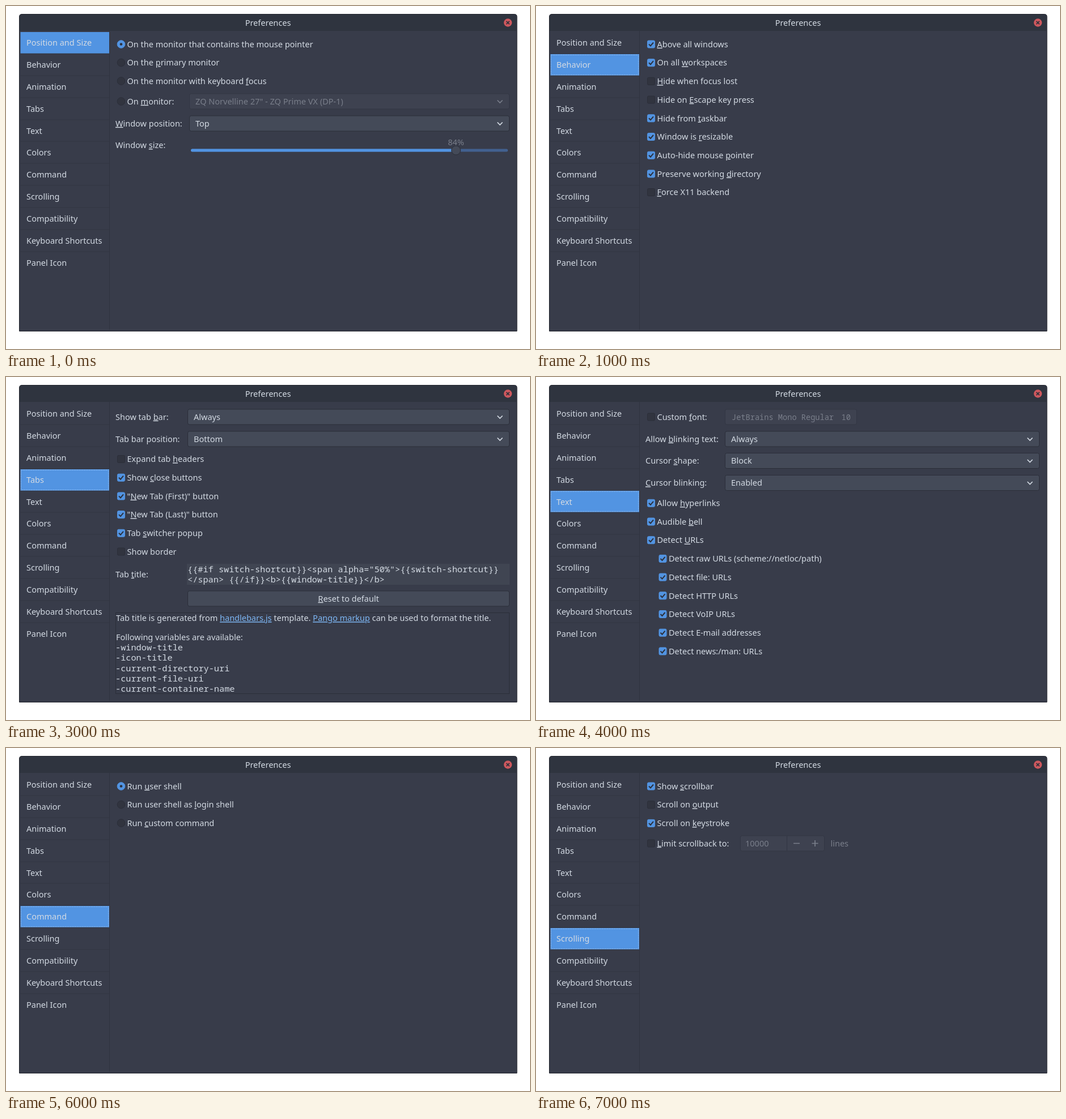
Recreate the animation shown at these times as an HTML page. Size 924 by 606 pixels, loop 8 s.

```html
<!DOCTYPE html>
<html lang="en">
<head>
<meta charset="utf-8">
<title>Preferences</title>
<style>
  html, body { margin: 0; height: 100%; overflow: hidden; background: #fff; }
  svg { display: block; }
  text { font: 14.5px "Noto Sans", "Open Sans", sans-serif; fill: #d3dae3; white-space: pre; }
  .mono { font: 15.25px "Noto Sans Mono", "DejaVu Sans Mono", monospace; }
  .font { font-size: 13.65px; }
  .dim { fill: #797e8a; }
  .mid { text-anchor: middle; }
  .key, .link { text-decoration: underline; text-decoration-skip-ink: none; }
  .link { fill: #7db7f5; }
  .line { fill: none; stroke: #d3dae3; stroke-width: 1.7; }
  .line.dim { stroke: #797e8a; }
</style>
</head>
<body>
<svg id="stage" width="924" height="606" viewBox="0 0 924 606"></svg>
<script>
const EDGE = '#2b2e39', BLUE = '#5294e2', DARK = '#2c303b', BUTTON = '#444a58';
const PAGE_MS = 1000, RIGHT = 887.5, ROW = 38.85, STEP = 32.7;

// y is always the vertical centre of a control; "_" marks the mnemonic letter.
const text = (x, y, label, cls = '') =>
  `<text x="${x}" y="${y + 5.2}" class="${cls}">${label.replace(/_(.)/, '<tspan class="key">$1</tspan>')}</text>`;

const rect = (x, y, w, h, fill, stroke = 'none', r = 0) =>
  `<rect x="${x}" y="${y}" width="${w}" height="${h}" rx="${r}" fill="${fill}" stroke="${stroke}"/>`;

const box = (x, y, right, dim) =>
  rect(x, y - 13.5, right - x, 27, dim ? '#3e4250' : BUTTON, dim ? '#323643' : EDGE, 3);

const combo = (x, y, label, { right = RIGHT, dim = '' } = {}) =>
  box(x, y, right, dim) + text(x + 10.5, y, label, dim) +
  `<path class="line ${dim}" d="M${right - 21} ${y - 2}l4.5 4.5 4.5-4.5"/>`;

const button = (x, y, label) => box(x, y, RIGHT, '') + text((x + RIGHT) / 2, y, label, 'mid');

const check = (y, label, on, x = 203) =>
  rect(x - 6.5, y - 6.5, 13, 13, on ? BLUE : '#31343f', on ? BLUE : EDGE, 2) +
  (on ? `<path d="M${x - 4} ${y}l3 3 5-6" fill="none" stroke="${DARK}" stroke-width="2"/>` : '') +
  text(x + 10.5, y, label);

const checks = (y, items, x) =>
  items.map(([label, on], i) => check(y + i * STEP, label, on, x)).join('');

const radio = (y, label, on) =>
  `<circle cx="203" cy="${y}" r="6.8" fill="${on ? BLUE : '#31343f'}" stroke="${on ? BLUE : EDGE}"/>` +
  (on ? `<circle cx="203" cy="${y}" r="2.3" fill="${DARK}"/>` : '') + text(213.5, y, label);

const slider = (x, y, knob, label) =>
  rect(x, y - 2.5, 885 - x, 5, '#426190', 'none', 2.5) +
  rect(x, y - 2.5, knob - x, 5, BLUE, 'none', 2.5) +
  `<circle cx="${knob}" cy="${y}" r="8" fill="${BUTTON}" stroke="${EDGE}"/>` +
  text(knob, y - 14, label, 'mid dim');

const swatch = (x, y, color, dim) =>
  rect(x - 22, y - 12.5, 44, 25, dim ? '#3e4250' : BUTTON, dim ? '#323643' : EDGE, 3) +
  rect(x - 17.5, y - 8, 35, 16, color, EDGE);

const swatches = (y, colors) =>
  colors.split(' ').map((c, i) => swatch(390 + i * 57.15, y, '#' + c)).join('');

const tabs = ['Position and Size', 'Behavior', 'Animation', 'Tabs', 'Text', 'Colors', 'Command',
  'Scrolling', 'Compatibility', 'Keyboard Shortcuts', 'Panel Icon'];

const pages = [
  // Position and Size
  radio(67.5, 'On the monitor that contains the mouse pointer', true) +
  radio(100, 'On the _primary monitor') +
  radio(132.5, 'On the monitor with keyboard _focus') +
  radio(168.5, 'On _monitor:') +
  combo(323.5, 168.5, 'ZQ Norvelline 27" - ZQ Prime VX (DP-1)', { dim: 'dim' }) +
  text(193, 207.5, '_Window position:') + combo(323.5, 207.5, 'Top') +
  text(193, 246, 'Window _size:') + slider(326, 255, 793.5, '84%'),

  // Behavior
  checks(67.5, [['_Above all windows', true], ['On all _workspaces', true],
    ['_Hide when focus lost'], ['Hide on _Escape key press'], ['Hide from _taskbar', true],
    ['Window is _resizable', true], ['Auto-hide mouse _pointer', true],
    ['Preserve working _directory', true], ['_Force X11 backend']]),

  // Animation
  check(67.5, '_Override default window animations', true) +
  text(193, 103, '_Show animation:') + combo(316.5, 103, 'Linear tweening') +
  text(193, 142, '_Hide animation:') + combo(316.5, 142, 'Linear tweening'),

  // Tabs
  text(193, 70.5, 'Show tab _bar:') + combo(320.5, 70.5, 'Always') +
  text(193, 109.5, 'Tab bar position:') + combo(320.5, 109.5, 'Bottom') +
  checks(145, [['Expand tab _headers'], ['Show _close buttons', true],
    ['"_New Tab (First)" button', true], ['"_New Tab (Last)" button', true],
    ['Tab _switcher popup', true], ['Show border']]) +
  text(193, 348.5, 'Tab _title:') + rect(319, 330, 569, 37, '#404552') +
  text(320, 339.5, '{{#if switch-shortcut}}&lt;span alpha="50%">{{switch-shortcut}}', 'mono') +
  text(320, 357.5, '&lt;/span> {{/if}}&lt;b>{{window-title}}&lt;/b>', 'mono') +
  button(320.5, 391.5, '_Reset to default') +
  rect(193.5, 416.5, 694, 143, 'none', EDGE) +
  text(194, 426, 'Tab title is generated from <tspan class="link">handlebars.js</tspan> template. ' +
    '<tspan class="link">Pango markup</tspan> can be used to format the title.') +
  text(194, 460, 'Following variables are available:') +
  ['window-title', 'icon-title', 'current-directory-uri', 'current-file-uri', 'current-container-name']
    .map((name, i) => text(193, 477.5 + i * 18.4, '-' + name, 'mono')).join(''),

  // Text
  check(70.5, 'Custom _font:') + box(333.5, 70.5, 565.5, 'dim') +
  text(345, 70.5, 'JetBrains Mono Regular', 'mono font dim') + text(538.5, 70.5, '10', 'mono font dim') +
  text(193, 109.5, 'Allow _blinking text:') + combo(333.5, 109.5, 'Always') +
  text(193, 148, 'Cursor _shape:') + combo(333.5, 148, 'Block') +
  text(193, 187, '_Cursor blinking:') + combo(333.5, 187, 'Enabled') +
  checks(222.8, [['Allow _hyperlinks', true], ['Audible _bell', true], ['Detect _URLs', true]]) +
  checks(320.9, ['raw URLs (scheme://netloc/path)', 'file: URLs', 'HTTP URLs', 'VoIP URLs',
    'E-mail addresses', 'news:/man: URLs'].map(kind => ['Detect ' + kind, true]), 223.5),

  // Colors
  text(193, 70.5, 'Theme _variant:') + combo(367.5, 70.5, 'Dark') +
  check(106, 'Use colors from system _theme') +
  text(193, 142, 'Color _scheme:') + combo(367.5, 142, 'GNOME dark', { right: 541.5 }) +
  text(407.5, 175.5, 'Foreground', 'mid') + text(500.5, 175.5, 'Background', 'mid') +
  text(193, 208, 'Default color:') + swatch(407.5, 208, '#d0cfcc') + swatch(500.5, 208, '#171421') +
  check(246, 'Bold color:') + swatch(407.5, 246, '#20232b', true) +
  check(283.8, 'Cursor color:') + swatch(407.5, 283.8, '#8e9198', true) + swatch(500.5, 283.8, '#20232b', true) +
  check(321.5, 'Highlight color:') + swatch(407.5, 321.5, '#9ea1a9', true) + swatch(500.5, 321.5, '#20232b', true) +
  check(359.8, '_Background opacity:', true) + slider(369.5, 368.5, 829.5, '90%') +
  text(193, 398.5, '_Palette:') + combo(367.5, 398.5, 'Tango') +
  swatches(437, '2e3436 cc0000 4e9a06 c4a000 3465a4 75507b 06989a d3d7cf') +
  swatches(475, '555753 ef2929 8ae234 fce94f 729fcf ad7fa8 34e2e2 eeeeec') +
  check(510, 'Show bold text in _bright colors') +
  button(193.5, 545.5, 'Copy profile from GNOME Terminal'),

  // Command
  radio(67.5, 'Run _user shell', true) +
  radio(100, 'Run user shell as _login shell') +
  radio(132.5, 'Run _custom command'),

  // Scrolling
  checks(67.5, [['Show _scrollbar', true], ['Scroll on _output'], ['Scroll on _keystroke', true]]) +
  check(168.5, '_Limit scrollback to:') + box(360.5, 168.5, 508.5, 'dim') +
  text(369, 168.5, '10000', 'dim') +
  '<path d="M442.5 155v27" stroke="#323643"/>' +
  '<path class="line dim" d="M454 168.5h11M486.500 168.500h11M492 163v11"/>' +
  text(519.5, 168.5, 'lines', 'dim')
];

const stage = document.getElementById('stage');
stage.innerHTML =
  '<path d="M23.500 574.500V19q0-4.500 4.500-4.500H896.500q4.500 0 4.500 4.500V574.500z" fill="#383c4a" stroke="#20232b"/>' +
  '<path d="M24 44V19q0-4 4-4H896.500q4 0 4 4V44z" fill="#2f343f"/>' +
  text(462, 29.5, 'Preferences', 'mid') +
  '<circle cx="885" cy="29.500" r="7.200" fill="#cc575d"/>' +
  `<path d="M882.300 26.800l5.400 5.400m0-5.400l-5.400 5.400" stroke="${DARK}" stroke-width="1.700"/>` +
  `<path d="M182.500 44V572" stroke="#30333f"/>` +
  tabs.slice(1).map((_, i) => rect(25, Math.round(84 + i * ROW) - 0.5, 157, 1, '#323643')).join('') +
  `<g id="selection">${rect(25.5, 46, 156.5, 37.7, BLUE)}
    <rect id="focus" x="26.500" y="47.500" width="154" height="35" fill="none" stroke="#9cc3f0" stroke-dasharray="1.500 1.500"/></g>` +
  tabs.map((name, i) => text(36, 65 + i * ROW, name)).join('') +
  pages.map(page => `<g class="page">${page}</g>`).join('');

const selection = document.getElementById('selection');
const focusRing = document.getElementById('focus');
const groups = [...document.querySelectorAll('.page')];

function draw() {
  const current = Math.floor(performance.now() / PAGE_MS) % pages.length;
  groups.forEach((group, i) => group.setAttribute('display', i === current ? 'inline' : 'none'));
  selection.setAttribute('transform', `translate(0 ${Math.round(current * ROW)})`);
  focusRing.setAttribute('display', current ? 'inline' : 'none');
  requestAnimationFrame(draw);
}
draw();
</script>
</body>
</html>
```
